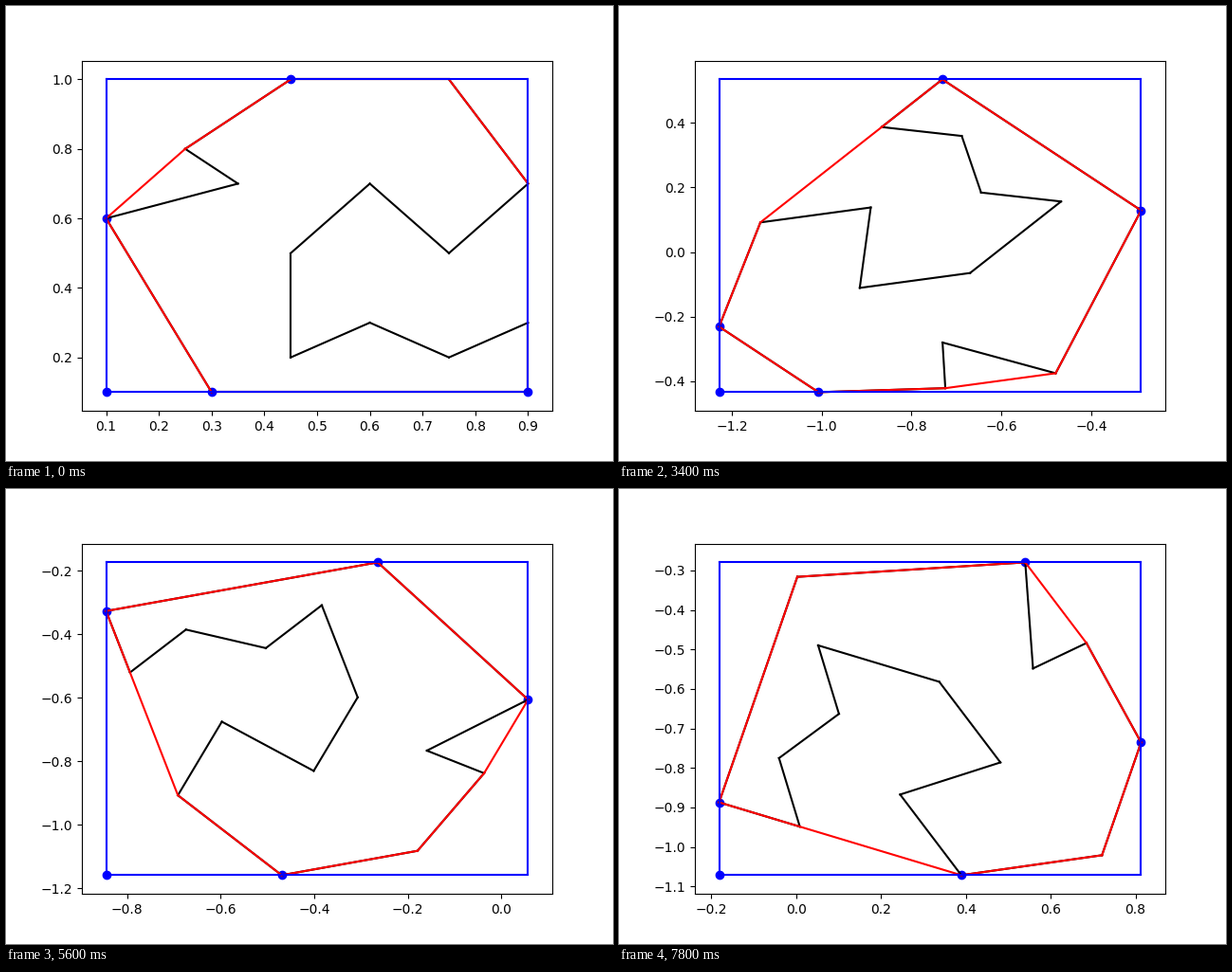
These frames come from a looping animation (640 by 480 pixels, 8000 ms). A matplotlib script:

```python
import numpy as np
import matplotlib.pyplot as plt
from matplotlib.animation import FuncAnimation

STEP = 0.1                # radians per turn step
PAD_X, PAD_Y = 0.0574, 0.06
FRAMES, INTERVAL = 40, 200

# The turn steps play in text order: 0, 1, 10, 11, ..., 19, 2, 20, ...
ORDER = sorted(range(63), key=str)[:FRAMES]


def zigzag(x0, x1, ya, yb):
    return [(x, (ya, yb)[i % 2]) for i, x in enumerate(np.linspace(x0, x1, 4))]


def make_shape():
    notch = [(0.1, 0.6), (0.35, 0.7), (0.25, 0.8)]
    roof = [(0.45, 1.0), (0.75, 1.0)]
    mouth = zigzag(0.9, 0.45, 0.7, 0.5) + zigzag(0.45, 0.9, 0.2, 0.3)
    base = [(0.9, 0.1), (0.3, 0.1)]
    return np.array(notch + roof + mouth + base)


def rotate(pts, angle):
    c, s = np.cos(angle), np.sin(angle)
    return pts @ np.array([(c, s), (-s, c)])


def half_hull(pts):
    chain = []
    for px, py in pts:
        while len(chain) > 1:
            (ax_, ay), (bx, by) = chain[-2:]
            if (bx - ax_) * (py - ay) - (by - ay) * (px - ax_) > 0:
                break
            chain.pop()
        chain.append((px, py))
    return chain


def convex_hull(ranked):
    return np.array(half_hull(ranked)[:-1] + half_hull(ranked[::-1])[:-1])


def draw_loop(ax, pts, color):
    """Draw a closed loop with one separate line per edge."""
    ends = np.roll(pts, -1, axis=0)
    ax.plot([pts[:, 0], ends[:, 0]], [pts[:, 1], ends[:, 1]], color=color)


SHAPE = make_shape()
fig, ax = plt.subplots(figsize=(6.4, 4.8), dpi=100)


def update(frame):
    ax.clear()
    pts = rotate(SHAPE, STEP * ORDER[frame])
    ranked = np.array(sorted(map(tuple, pts)))
    (x0, y0), (x1, y1) = pts.min(axis=0), pts.max(axis=0)

    draw_loop(ax, pts, "black")
    draw_loop(ax, convex_hull(ranked), "red")
    draw_loop(ax, np.array([(x0, y0), (x1, y0), (x1, y1), (x0, y1)]), "blue")

    # Ties go to the point that comes first by x, then y
    ends = np.concatenate([ranked.argmin(axis=0), ranked.argmax(axis=0)])
    dots = np.vstack([ranked[ends], (x0, y0)])
    ax.scatter(dots[:, 0], dots[:, 1], color="blue")

    mx, my = PAD_X * (x1 - x0), PAD_Y * (y1 - y0)
    ax.set_xlim(x0 - mx, x1 + mx)
    ax.set_ylim(y0 - my, y1 + my)


anim = FuncAnimation(fig, update, frames=FRAMES, interval=INTERVAL,
                     init_func=lambda: update(0), repeat=True,
                     repeat_delay=0, blit=False)
plt.show()
```
